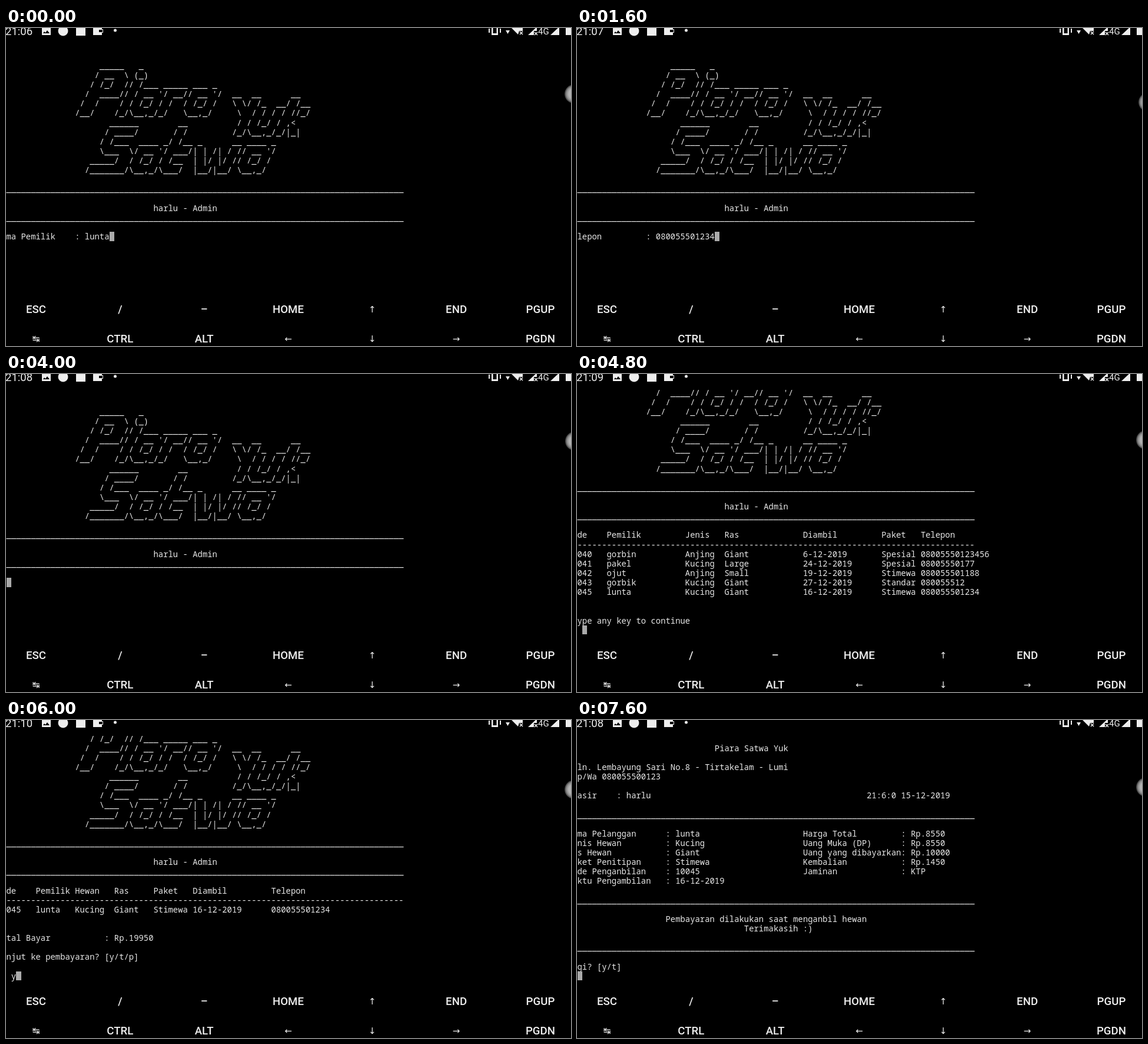
An HTML page for the animation above (8000 ms loop, 960 by 540 pixels).

```html
<!DOCTYPE html>
<html lang="id">
<head>
<meta charset="utf-8">
<title>Terminal</title>
<style>
  html, body { margin: 0; width: 100%; height: 100%; overflow: hidden; background: #000; }
  #stage { position: relative; width: 960px; height: 540px; overflow: hidden; background: #000; color: #e8e8e8; }
  #term { position: absolute; left: .5px; top: 23.5px; margin: 0; font: 13.9px/16.13px "Noto Sans Mono", monospace; }
  #cursor { position: absolute; width: 8.34px; height: 15.6px; background: #aaa; }
  svg { position: absolute; inset: 0; }
  svg text { font-family: Roboto, "DejaVu Sans", sans-serif; fill: #eee; }
  #keys text { font-size: 18.7px; font-weight: 500; text-anchor: middle; }
  #keys .arrow { font: 15px "DejaVu Sans", sans-serif; }
</style>
</head>
<body>
<div id="stage">
  <pre id="term"></pre>
  <div id="cursor"></div>
  <svg width="960" height="540" fill="#eee">
    <defs>
      <radialGradient id="knob">
        <stop offset=".55" stop-color="#b4b4b4"/>
        <stop offset=".8" stop-color="#8a8a8a"/>
        <stop offset="1" stop-color="#333"/>
      </radialGradient>
    </defs>
    <text id="clock" x="-1" y="12" font-size="18.5"></text>
    <path d="M61-2h15v14H61zM63 9h11l-4-5-3 4-2-2z" fill-rule="evenodd"/>
    <circle cx="97" cy="5" r="8.5"/>
    <path d="M119-2h16v15h-16z"/>
    <path d="M148-2h15v4h2v6h-2v4h-15zM158 3v4h6V3z" fill-rule="evenodd"/>
    <circle cx="185.500" cy="4" r="2.500"/>
    <path d="M825-2h11v14h-11zM827.500 0v9h6V0zM820 1h2v7h-2zM839 1h2v7h-2z" fill-rule="evenodd"/>
    <path d="M849 4h7l-3.500 6zM858-1h20v6h-6l-2 6zM887 12l15-14v7h-5v7zM925 12l15-14v14zM951 0h9v12h-9z"/>
    <path d="M873 6l5 5m0-5l-5 5M898 7l5 5m0-5l-5 5" stroke="#eee" stroke-width="1.500"/>
    <text x="904" y="11" font-size="15">4G</text>
    <circle id="bubble" r="16" fill="url(#knob)"/>
    <g id="keys"></g>
  </svg>
</div>
<script>
const CELL = 8.34, ROW = 16.13, TOP = 23.5, ROWS = 26, STEP = 400;
const $ = id => document.getElementById(id);

const owner = 'lunta', admin = 'harlu', phone = '080055501234';
const rule = '_'.repeat(81), dashes = '-'.repeat(81);

const art = String.raw`
                   _____   _
                  / __  \ (_)
                 / /_/  // /___ _____ ___ _
                /  ____// / __ '/ __// __ '/  __  __      __
               /  /    / / /_/ / /  / /_/ /   \ \/ /_  __/ /__
              /__/    /_/\__,_/_/   \__,_/     \  / / / / //_/
                     ______        __          / / /_/ / ,<
                    / ____/       / /         /_/\__,_/_/|_|
                   / /___  ____ _/ /__ _      __ ____ _
                   \___  \/ __ '/ ___/| | /| / // __ '/
                 _____/  / /_/ / /__  | |/ |/ // /_/ /
                /_______/\__,_/\___/  |__/|__/ \__,_/`.split('\n').slice(1);

// Lays out values at the given columns of one line.
const cells = (cols, ...values) =>
  values.reduce((line, value, i) => line.padEnd(cols[i]) + value, '');

const page = (...body) =>
  ['', '', ...art, '', rule, '', cells([30], admin + ' - Admin'), rule, '', ...body];

const ask = (label, value) => page(cells([0, 14], label, ': ' + value));

const pay = (label, total, paid) => page(
  cells([0, 20], label, ': ' + total),
  cells([0, 20], 'ng yang dibayarkan', ': ' + paid));

const listCols = [0, 6, 22, 30, 46, 62, 70];
const list = page(
  cells(listCols, 'de', 'Pemilik', 'Jenis', 'Ras', 'Diambil', 'Paket', 'Telepon'),
  dashes,
  cells(listCols, '040', 'gorbin', 'Anjing', 'Giant', '6-12-2019', 'Spesial', '08005550123456'),
  cells(listCols, '041', 'pakel', 'Kucing', 'Large', '24-12-2019', 'Spesial', '08005550177'),
  cells(listCols, '042', 'ojut', 'Anjing', 'Small', '19-12-2019', 'Stimewa', '080055501188'),
  cells(listCols, '043', 'gorbik', 'Kucing', 'Giant', '27-12-2019', 'Standar', '080055512'),
  cells(listCols, '045', owner, 'Kucing', 'Giant', '16-12-2019', 'Stimewa', phone),
  '', '', 'ype any key to continue', ' ');

const itemCols = [0, 6, 14, 22, 30, 38, 54];
const checkout = answer => page(
  cells(itemCols, 'de', 'Pemilik', 'Hewan', 'Ras', 'Paket', 'Diambil', 'Telepon'),
  dashes,
  cells(itemCols, '045', owner, 'Kucing', 'Giant', 'Stimewa', '16-12-2019', phone),
  '', '', cells([0, 20], 'tal Bayar', ': Rp.19950'),
  '', 'njut ke pembayaran? [y/t/p]', '', ' ' + answer);

const billCols = [0, 18, 46, 66];
const bill = (a, b, c, d) => cells(billCols, a, ': ' + b, c, ': Rp.' + d);
const receipt = (time, total, paid, change) => [
  '', cells([28], 'Piara Satwa Yuk'), '',
  'ln. Lembayung Sari No.8 - Tirtakelam - Lumi', 'p/Wa 080055500123', '',
  cells([0, 8, 59], 'asir', ': ' + admin, time + ' 15-12-2019'), '', rule, '',
  bill('ma Pelanggan', owner, 'Harga Total', total),
  bill('nis Hewan', 'Kucing', 'Uang Muka (DP)', '8550'),
  bill('s Hewan', 'Giant', 'Uang yang dibayarkan', paid),
  bill('ket Penitipan', 'Stimewa', 'Kembalian', change),
  cells(billCols, 'de Penganbilan', ': 10045', 'Jaminan', ': KTP'),
  cells(billCols, 'ktu Pengambilan', ': 16-12-2019'),
  '', rule, '',
  cells([18], 'Pembayaran dilakukan saat menganbil hewan'),
  cells([34], 'Terimakasih :)'), '', rule, ''];
const deposit = [...receipt('21:6:0', '8550', '10000', '1450'), 'gi? [y/t]', ''];
const settled = [...receipt('21:10:0', '19950', '20000', '50'), ''];

// Each step: minute, bubble x and y, lines.
const steps = [
  [6, 965, 112, ask('ma Pemilik', owner)],
  [6, 965, 112, ask('nis Hewan', 'Kucing')],
  [7, 965, 114, ask('s Hewan', 'Giant')],
  [7, 966, 120, ask('ket', 'Stimewa')],
  [7, 970, 126, ask('lepon', phone)],
  [7, 966, 114, ask('ktu Diambil', '16-12-2019')],
  [7, 965, 100, ask('minan', '')],
  [7, 965, 90, ask('minan', 'KTP')],
  [7, 966, 79, pay('ng Muka (DP)', '8550', '10000')],
  [8, 966, 114, deposit],
  [8, 966, 114, page('')],
  [9, 966, 112, page('')],
  [9, 966, 112, list],
  [9, 965, 114, ask('de', '10045')],
  [9, 965, 116, checkout('')],
  [10, 965, 118, checkout('y')],
  [10, 965, 118, checkout('y')],
  [10, 959, 122, pay('tal Bayar', '19950', '20000')],
  [10, 965, 118, settled],
  [8, 966, 114, deposit]
];

const keys = ['ESC', '/', '–', 'HOME', '↑', 'END', 'PGUP', '↹', 'CTRL', 'ALT', '←', '↓', '→', 'PGDN'];
$('keys').innerHTML = keys.map((key, i) => {
  const arrow = /[↑↓←→↹]/.test(key);
  const y = (i < 7 ? 484 : 533.5) - (arrow ? 1 : 0);
  return `<text x="${51 + i % 7 * 142.83}" y="${y}"${arrow ? ' class="arrow"' : ''}>${key}</text>`;
}).join('');

let shown = -1;
function draw(now) {
  const index = Math.floor(now / STEP) % steps.length;
  if (index !== shown) {
    shown = index;
    const [minute, x, y, lines] = steps[index];
    const visible = lines.slice(-ROWS);
    $('term').textContent = visible.join('\n');
    $('cursor').style.left = .5 + visible.at(-1).length * CELL + 'px';
    $('cursor').style.top = TOP + (visible.length - 1) * ROW + 'px';
    $('clock').textContent = '21:' + String(minute).padStart(2, '0');
    $('bubble').setAttribute('cx', x);
    $('bubble').setAttribute('cy', y);
  }
  requestAnimationFrame(draw);
}
draw(performance.now());
</script>
</body>
</html>
```
